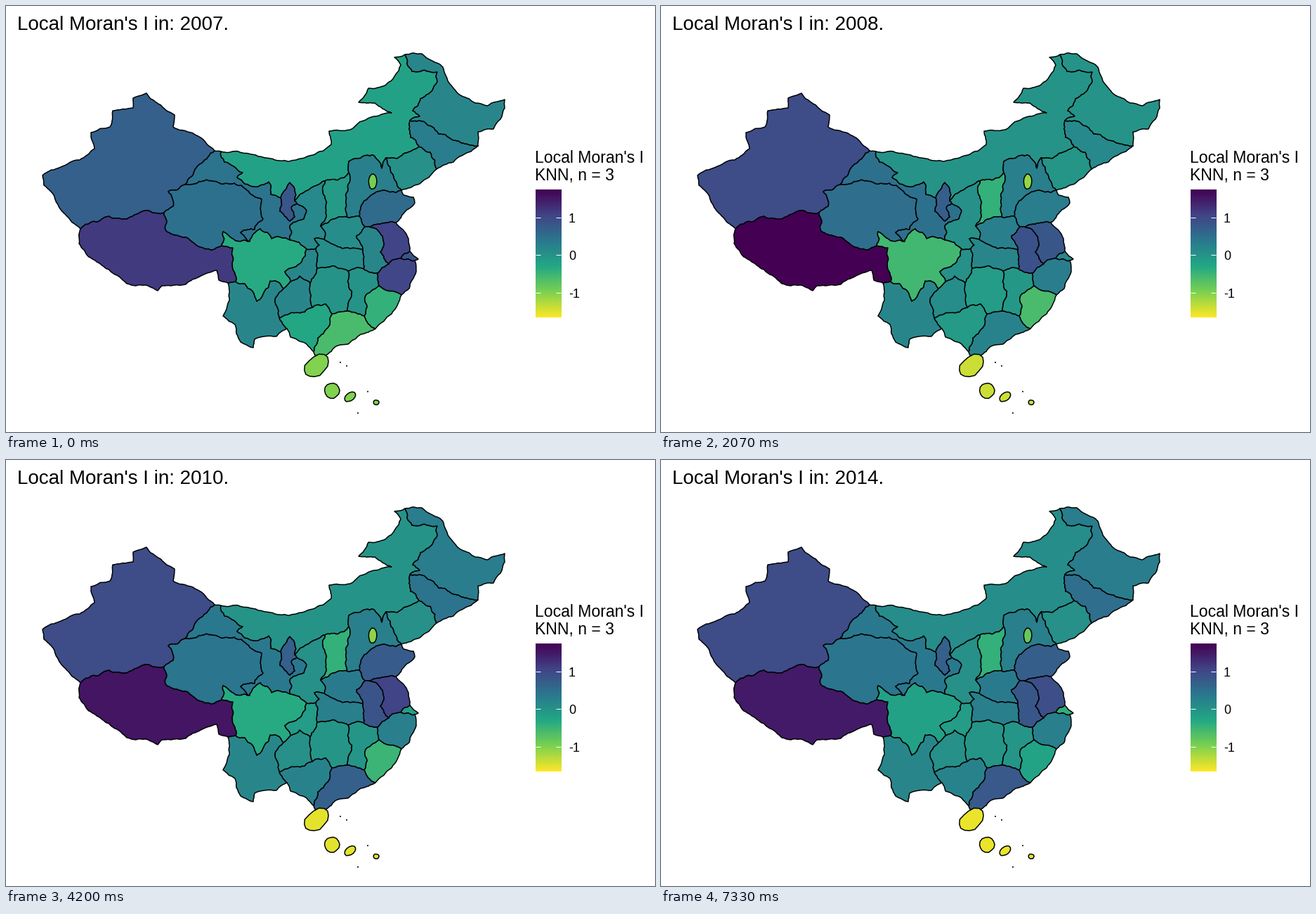
A matplotlib script that plays this animation: 924 px wide and 606 px high, repeating every 8 s.

```python
from itertools import combinations

import numpy as np
import matplotlib.pyplot as plt
from matplotlib.animation import FuncAnimation
from matplotlib.colors import LinearSegmentedColormap
from matplotlib.patches import Polygon

W, H = 924, 606
FRAMES, INTERVAL = 200, 40
YEAR_TICKS = [*range(0, 97, 16), 110]  # in fifteenths of a second
YEARS = np.arange(2007, 2015)
KEY_YEARS = [2007, 2009, 2011, 2014]

rng = np.random.default_rng(7)
cmap = LinearSegmentedColormap.from_list(
    "fill", ["#440154", "#414487", "#2A788E", "#22A884", "#7AD151", "#FDE725"], N=512)

plt.rcParams["font.family"] = "Liberation Sans"
# 72 dpi makes one point one pixel
fig = plt.figure(figsize=((W + 0.01) / 72, (H + 0.01) / 72), dpi=72, facecolor="white")
ax = fig.add_axes([0, 0, 1, 1])
ax.axis("off")

junctions = []
bends = {}
borders = {}
filled = []


def junction(sides, x, y):
    """A point where the named regions meet."""
    junctions.append((set(sides.split()), np.array([x, y], float)))


def bend(sides, *xy):
    """Key points that a border passes on its way between two junctions."""
    bends[frozenset(sides.split())] = np.array(xy, float).reshape(-1, 2)


def roughen(pts, rough):
    """Split long segments at a shifted midpoint until all are short."""
    line = [pts[0]]
    for a, b in zip(pts[:-1], pts[1:]):
        dx, dy = b - a
        if np.hypot(dx, dy) > 4.5:
            mid = (a + b) / 2 + rng.uniform(-rough, rough) * np.array([-dy, dx])
            line += list(roughen([a, mid, b], rough)[1:])
        else:
            line.append(b)
    return np.array(line)


def build_borders():
    """Join each pair of junctions that share the same two regions."""
    names = sorted(set().union(*(sides for sides, _ in junctions)))
    for pair in map(frozenset, combinations(names, 2)):
        ends = [point for sides, point in junctions if pair <= sides]
        if len(ends) != 2:
            continue
        mid = bends.get(pair, np.empty((0, 2)))
        ways = [np.vstack([a, mid, b]) for a, b in (ends, ends[::-1])]
        way = min(ways, key=lambda p: np.hypot(*np.diff(p, axis=0).T).sum())
        borders[pair] = roughen(way, 0.08 if "sea" in pair else 0.14)


def outline(name):
    """Chain all borders of a region into one ring."""
    parts = [line for pair, line in borders.items() if name in pair]
    ring = [parts.pop(0)]
    while parts:
        end = ring[-1][-1]
        options = [line for p in parts for line in (p, p[::-1])]
        k = int(np.argmin([np.hypot(*(line[0] - end)) for line in options]))
        parts.pop(k // 2)
        ring.append(options[k])
    return np.vstack(ring)


def fill(pts, values):
    """Values are percent of the colour scale at the key years; the last one holds."""
    patch = Polygon(pts, closed=True, ec="black", lw=1.5, joinstyle="round")
    ax.add_patch(patch)
    filled.append((patch, np.interp(YEARS, KEY_YEARS[:len(values)], values) / 100))


def region(name, *values):
    fill(outline(name), values)


def blob(x, y, rx, ry, tilt, values):
    a = np.linspace(0, 2 * np.pi, 15)[:-1]
    r = rng.uniform(0.92, 1.06, len(a))
    u, v = rx * r * np.cos(a), ry * r * np.sin(a)
    c, s = np.cos(np.radians(tilt)), np.sin(np.radians(tilt))
    fill(np.column_stack([x + u * c - v * s, y + u * s + v * c]), values)


# West
junction("XJ GS sea", 297, 206)
junction("GS IM sea", 306, 207)
junction("XJ XZ sea", 106, 317)
junction("XJ XZ QH", 225, 294)
junction("XJ GS QH", 255, 254)
junction("XZ QH SC", 307, 341)
junction("XZ SC YN", 327, 392)
junction("XZ YN sea", 316, 394)
junction("QH GS SC", 347, 335)
junction("GS SN SC", 404, 333)
junction("IM GS NX", 391, 273)
junction("IM NX SN", 411, 277)
junction("GS NX SN", 414, 281)
bend("XJ sea", 275, 186, 238, 172, 240, 155, 206, 132, 200, 124, 193, 127, 181, 131,
     181, 145, 152, 149, 148, 172, 121, 180, 126, 203, 105, 219, 52, 241, 54, 255,
     64, 264, 84, 296)
bend("XZ sea", 104, 338, 118, 357, 155, 382, 172, 395, 198, 397, 216, 405, 222, 398,
     256, 396, 300, 376, 303, 390)
bend("XJ GS", 278, 224)
bend("XJ QH", 231, 264, 238, 285)
bend("XJ XZ", 122, 307, 172, 303, 203, 291)
bend("XZ QH", 227, 318, 262, 333, 292, 347)
bend("XZ SC", 323, 344)
bend("QH SC", 309, 321, 321, 330)
bend("QH GS", 335, 255, 364, 275, 366, 303, 354, 318, 334, 322)
bend("GS SC", 362, 317, 378, 331)
bend("IM GS", 311, 222, 337, 237, 329, 244, 354, 257, 374, 250, 377, 268)
bend("IM NX", 398, 261, 404, 251, 411, 260)
bend("GS NX", 390, 292, 404, 306, 411, 300, 406, 287)
bend("GS SN", 428, 291, 424, 303, 405, 311)

# North
junction("IM SN SX", 454, 249)
junction("IM SX HE", 488, 237)
junction("IM HE LN", 541, 216)
junction("IM LN JL", 588, 200)
junction("IM JL HL", 575, 163)
junction("IM HL sea", 568, 69)
junction("JL HL sea", 672, 199)
junction("LN JL sea", 613, 232)
junction("HE LN SD sea", 563, 262)
junction("HE SX HA", 485, 300)
junction("HE HA SD", 503, 299)
bend("IM sea", 553, 73, 562, 84, 541, 112, 516, 117, 502, 137, 525, 138, 549, 152,
     520, 158, 490, 176, 460, 178, 463, 197, 437, 212, 390, 220, 350, 211)
bend("HL sea", 672, 179, 694, 175, 710, 145, 710, 133, 685, 142, 668, 138, 633, 112,
     622, 87, 592, 68)
bend("JL sea", 637, 222, 662, 207)
bend("LN sea", 589, 253)
bend("IM SN", 423, 266)
bend("IM HE", 488, 221, 522, 212, 535, 231)
bend("IM LN", 557, 217)
bend("IM JL", 576, 187)
bend("IM HL", 578, 93, 614, 94, 607, 120, 579, 149, 589, 157)
bend("JL HL", 600, 169, 635, 190)
bend("LN JL", 604, 208)
bend("HE LN", 552, 243)
bend("HE SD", 530, 264, 510, 277)
bend("HE SX", 487, 260)
bend("SN SX", 452, 268)

# Centre
junction("SN SX HA", 448, 313)
junction("SN HA HB", 453, 332)
junction("SN HB CQ", 441, 345)
junction("SN SC CQ", 428, 346)
junction("SC CQ GZ", 405, 392)
junction("SC GZ YN", 395, 402)
junction("CQ GZ HN", 433, 394)
junction("CQ HB HN", 443, 373)
junction("HB HN JX", 487, 377)
junction("HB JX AH", 509, 374)
junction("HA HB AH", 508, 347)
junction("HA SD AH", 511, 314)
bend("SN HA", 455, 324)
bend("SN HB", 439, 331, 446, 340)
bend("SC CQ", 421, 364, 397, 378)
bend("SC YN", 340, 395, 357, 420, 376, 391, 386, 392)
bend("CQ GZ", 418, 384)
bend("HA AH", 499, 327)

# East and south
junction("JS SD AH", 517, 314)
junction("JS SD sea", 555, 308)
junction("JS AH ZJ", 545, 367)
junction("JS ZJ SH", 562, 359)
junction("JS SH sea", 575, 349)
junction("ZJ SH sea", 582, 362)
junction("JX AH ZJ", 529, 380)
junction("JX ZJ FJ", 531, 398)
junction("ZJ FJ sea", 563, 411)
junction("JX FJ GD", 510, 441)
junction("FJ GD sea", 526, 459)
junction("HN JX GD", 486, 434)
junction("HN GX GD", 464, 438)
junction("GX GD sea", 438, 492)
junction("GZ GX HN", 436, 429)
junction("YN GZ GX", 389, 444)
junction("YN GX sea", 400, 459)
bend("SD sea", 582, 280, 580, 272, 566, 269)
bend("JS sea", 573, 331)
bend("SH sea", 587, 360)
bend("ZJ sea", 574, 402, 584, 378)
bend("FJ sea", 549, 438)
bend("GD sea", 440, 497, 455, 497, 470, 484, 487, 481)
bend("GX sea", 405, 471, 428, 481)
bend("YN sea", 318, 419, 309, 441, 326, 453, 334, 478, 352, 486, 354, 474, 385, 470)
bend("JS AH", 530, 320, 538, 337, 533, 350)
bend("JX FJ", 511, 415)
bend("HN GX", 455, 424)
bend("GX GD", 458, 458)
bend("YN GZ", 383, 417)

build_borders()
region("XJ", 31, 23)
region("XZ", 17, 0, 6, 7.5)
region("QH", 37, 36, 39)
region("GS", 38, 37, 40)
region("NX", 27, 30, 31)
region("IM", 57, 51, 51, 49)
region("SN", 47, 50)
region("SX", 54, 64)
region("HE", 43)
region("LN", 50, 52, 50)
region("JL", 42, 47, 38, 36)
region("HL", 46, 51, 42)
region("SD", 35, 42, 29, 30)
region("HA", 49, 43, 41)
region("AH", 46, 25, 26, 27)
region("JS", 20, 27, 20, 24)
region("SH", 27, 46, 56, 63)
region("ZJ", 21, 42, 43)
region("HB", 49, 46, 43)
region("HN", 51, 55, 52)
region("JX", 51, 53, 52)
region("FJ", 64, 69, 66, 58)
region("GD", 69, 44, 31, 28)
region("GX", 59, 54, 44)
region("GZ", 46, 49, 50)
region("YN", 46)
region("SC", 61, 67, 61, 57)
region("CQ", 46, 50, 55)

blob(522, 250, 6, 10.5, 0, [79, 84, 83, 75])
for island in [(442, 512, 20, 13.5, -38), (464, 547, 11, 11, 0),
               (490, 556, 9, 5.5, -35), (527, 564, 4, 3.5, 0)]:
    blob(*island, [81, 92, 96, 97])
for dot in [(476, 507), (485, 512), (515, 548.5), (501, 579)]:
    ax.add_patch(plt.Circle(dot, 1, color="black", lw=0))

# Legend
LEFT, RIGHT, TOP, BOTTOM = 754, 790, 262, 443
ax.imshow(np.linspace(0, 1, 256)[:, None], cmap=cmap, extent=(LEFT, RIGHT, BOTTOM, TOP),
          aspect="auto", interpolation="bilinear")
ax.set_xlim(0, W)
ax.set_ylim(H, 0)
for value in (1, 0, -1):
    y = 354.5 - 53.5 * value
    for x in (LEFT, RIGHT - 7):
        ax.plot([x, x + 7], [y, y], color="white", lw=1, solid_capstyle="butt")
    ax.text(801, y + 6.5, str(value), size=18)
ax.text(752.5, 223, "Local Moran's I", size=23)
ax.text(752.5, 248, "KNN, n = 3", size=23)
title = ax.text(16, 34, "", size=27.8)


def year_index(tick):
    return sum(tick >= start for start in YEAR_TICKS) - 1


def update(frame):
    tick = (3 * frame + 2) // 5
    # The fill changes one tick before the title does
    k = year_index(tick + 1)
    for patch, levels in filled:
        patch.set_facecolor(cmap(levels[k]))
    title.set_text(f"Local Moran's I in: {YEARS[year_index(tick)]}.")
    return [title]


anim = FuncAnimation(fig, update, frames=FRAMES, interval=INTERVAL,
                     repeat=True, repeat_delay=0, blit=False)
plt.show()
```
